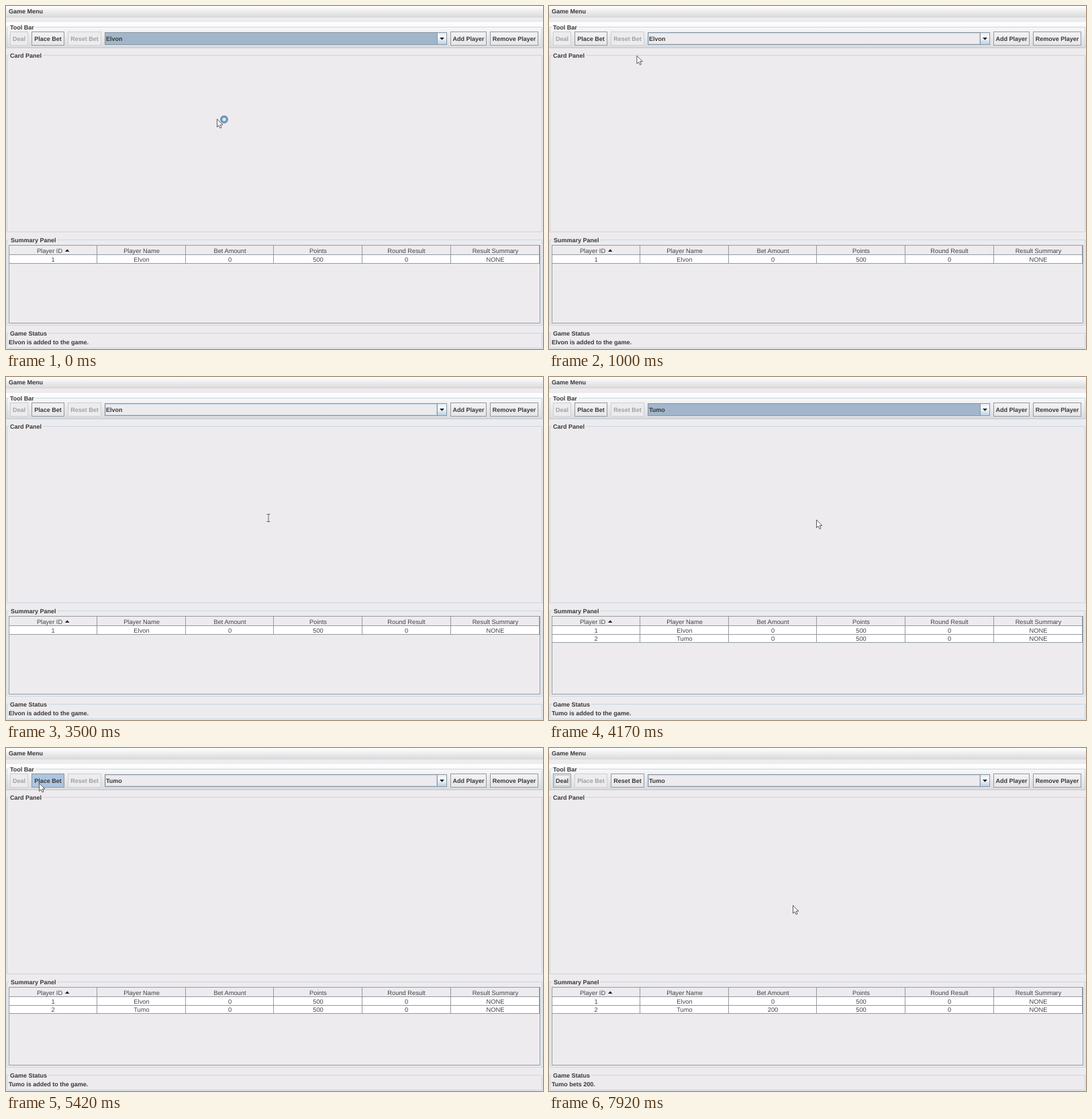
Animation, 800 px wide and 511 px high, one loop 8000 ms. Source, as an HTML page:

```html
<!DOCTYPE html>
<html lang="en">
<head>
<meta charset="utf-8">
<title>Card game window</title>
<style>
html, body { margin: 0; width: 100%; height: 100%; overflow: hidden; background: #edebee; }
svg { display: block; width: 100%; height: 100%; }
text { font: 9.3px "Liberation Sans", Arial, sans-serif; fill: #444; white-space: pre; text-rendering: geometricPrecision; }
.b { font-size: 9px; font-weight: bold; fill: #383838; }
.key { font-size: 7.9px; fill: #6382bf; }
</style>
</head>
<body>
<svg id="stage" viewBox="0 0 800 511" preserveAspectRatio="none">
  <defs>
    <linearGradient id="bar" x2="0" y2="1">
      <stop offset="0" stop-color="#fff"/><stop offset="1" stop-color="#dcdbdd"/>
    </linearGradient>
    <linearGradient id="btn" x2="0" y2="1">
      <stop offset="0" stop-color="#f3f2f4"/><stop offset="1" stop-color="#e6e5e7"/>
    </linearGradient>
    <linearGradient id="drop" x2="0" y2="1">
      <stop offset="0" stop-color="#dde8f3"/><stop offset=".35" stop-color="#fff"/><stop offset="1" stop-color="#b8cfe5"/>
    </linearGradient>
  </defs>
</svg>
<script>
const NS = "http://www.w3.org/2000/svg";
const stage = document.getElementById("stage");
const FIRST = "Elvon", SECOND = "Tumo";
const EDGE = "#8795a3", GRID = "#959aa0", PALE = "#c6d6e4", PICK = "#a1b6ca", DOWN = "#adc5df", BASE = "#edebee";

function add(parent, tag, attrs) {
  const el = document.createElementNS(NS, tag);
  for (const k in attrs) el.setAttribute(k, attrs[k]);
  parent.appendChild(el);
  return el;
}
const group = (parent = stage) => add(parent, "g", {});
const rect = (parent, x, y, width, height, fill, stroke = "none") =>
  add(parent, "rect", { x, y, width, height, fill, stroke });
const path = (parent, d, fill, stroke = "none", width = 1) =>
  add(parent, "path", { d, fill, stroke, "stroke-width": width });
// y is the middle of the line of text
function label(parent, str, x, y, cls = "b", anchor = "start") {
  const el = add(parent, "text", { x, y: y + 3.2, class: cls, "text-anchor": anchor });
  el.textContent = str;
  return el;
}
const show = (el, on) => el.setAttribute("display", on ? "inline" : "none");

function titled(str, y, bottom, x, gapEnd) {
  path(stage, `M${x - 2} ${y}H1.5V${bottom}H798.5V${y}H${gapEnd}`, "none", PALE);
  label(stage, str, x, y);
}

function button(str, x, right) {
  const box = rect(stage, x + .5, 38.5, right - x - 1, 20, "url(#btn)", GRID);
  const ring = rect(stage, x + 2.5, 40.5, right - x - 5, 16, "none", "#b3c4d6");
  const txt = label(stage, str, (x + right) / 2, 49, "b", "middle");
  return (state) => {
    const off = state === "off", down = state === "down";
    box.setAttribute("fill", down ? DOWN : off ? "#ecebed" : "url(#btn)");
    box.setAttribute("stroke", off ? "#cfd0d3" : down ? EDGE : GRID);
    txt.style.fill = off ? "#a0a0a2" : "#383838";
    show(ring, state === "focus");
  };
}

// window
rect(stage, 0, 0, 800, 511, BASE);
rect(stage, 0, 0, 800, 16, "url(#bar)");
rect(stage, 0, 16, 800, 1, "#d6d5d7");
rect(stage, 0, 24, 800, 38, "url(#bar)");
rect(stage, 0, 62, 800, 1, "#d0cfd1");
titled("Tool Bar", 31.5, 61.5, 6, 44);
titled("Card Panel", 73.5, 336.5, 6, 55);
titled("Summary Panel", 348.5, 475.5, 7, 76);
titled("Game Status", 487.5, 509.5, 6, 63);

const deal = button("Deal", 6, 33);
const bet = button("Place Bet", 38, 87);
const reset = button("Reset Bet", 92, 142);
button("Add Player", 662, 716)("on");
button("Remove Player", 721, 793)("on");

// player chooser
const combo = rect(stage, 147.5, 39.5, 509, 18, BASE, EDGE);
const comboInner = rect(stage, 148.5, 40.5, 493, 16, "none", "#c4d5e6");
rect(stage, 642.5, 39.5, 14, 18, "url(#drop)", EDGE);
path(stage, "M646 47H653L649.5 50.8Z", "#222");
const comboText = label(stage, "", 149, 48.5);

// table
const centers = [70, 202, 333.5, 465, 596.5, 729];
const columns = [135.5, 267.5, 398.5, 530.5, 662.5, 794.5];
rect(stage, 4.5, 356.5, 791, 116, "none", GRID);
["Player ID", "Player Name", "Bet Amount", "Points", "Round Result", "Result Summary"]
  .forEach((s, i) => label(stage, s, i ? centers[i] : 65, 364.5, "", "middle"));
path(stage, "M88 366H94.5L91.2 362.3Z", "#222");
path(stage, "M5 370.5H795" + columns.map(x => `M${x} 357V371`).join(""), "none", GRID);

function row(y, values) {
  const g = group();
  rect(g, 5, y, 789, 12, "#fff");
  path(g, `M5 ${y + 12.5}H795` + columns.map(x => `M${x} ${y}V${y + 12.5}`).join(""), "none", GRID);
  return { g, cells: values.map((v, i) => label(g, v, centers[i], y + 6.4, "", "middle")) };
}
// the lower row goes in first so that the line between the rows stays on top
const second = row(383, ["2", SECOND, "0", "500", "0", "NONE"]);
row(371, ["1", FIRST, "0", "500", "0", "NONE"]);
const status = label(stage, "", 4, 501);

// menu
const menu = group();
rect(menu, 0, 0, 58.5, 16.5, PICK, "#7f9bb8");
rect(menu, .5, 17.5, 139.5, 96, BASE, "#6f8fb5");
const items = [["New Game", "Ctrl-N"], ["Add Player", "Shift-Plus"], ["Remove Player", "Shift-Minus"],
  ["Check For Updates", ""], ["About", ""], ["Exit", "Ctrl-X"]].map(([name, key], i) => {
  const y = 26 + i * 15.75;
  const back = rect(menu, 1, y - 7.8, 138.5, 15.6, PICK);
  label(menu, name, 5, y);
  return { back, key: label(menu, key, 90, y, "key") };
});
label(stage, "Game Menu", 4, 8);

// pointers
const pointer = group();
const arrow = path(pointer, "M.5 .5V12.3L3.2 9.8L5.1 14L7 13.1L5.2 9H8.9Z", "#fff", "#333", .8);
const beam = path(pointer, "M-2.5 -5.5H2.5M0 -5.5V5.5M-2.5 5.5H2.5", "none", "#555", .9);
const busy = group(pointer);
add(busy, "circle", { cx: 11, cy: 1, r: 4.5, fill: "#b9d4e6", stroke: "#6d93b5", "stroke-width": 3 });
add(busy, "circle", { cx: 11, cy: 1, r: 1.8, fill: "#e4f1f8" });

// time, x, y
const track = [
  [0, 314, 168], [420, 40, 9], [500, 41, 12], [580, 41, 20], [750, 45, 39], [920, 46, 41],
  [1250, 617, 262], [1500, 401, 214], [1670, 391, 211], [2250, 391, 210], [3920, 391, 210],
  [4500, 409, 216], [4750, 409, 216], [5330, 49, 52], [5500, 49, 52], [6080, 357, 224],
  [6330, 357, 224], [6500, 362, 241], [6670, 362, 241], [6750, 362, 234], [7750, 362, 234],
  [7920, 363, 234], [8000, 363, 234]
];

function spot(t) {
  const i = Math.max(1, track.findIndex(p => p[0] >= t));
  const [t0, x0, y0] = track[i - 1], [t1, x1, y1] = track[i];
  const u = (t - t0) / (t1 - t0), e = u * u * (3 - 2 * u);
  return [x0 + (x1 - x0) * e, y0 + (y1 - y0) * e];
}

function draw(time) {
  const t = Math.floor((time + 4) * .012) / .012 + .01;
  const [x, y] = spot(Math.min(t, 7999));
  const joined = t >= 3916, placed = t >= 7750;
  const focused = t < 500 || (joined && t < 5330);

  pointer.setAttribute("transform", `translate(${x.toFixed(2)} ${y.toFixed(2)})`);
  const text = t >= 1410 && !joined;
  show(beam, text);
  show(arrow, !text);
  show(busy, t < 170);

  show(menu, t >= 490 && t < 916);
  items.forEach((item, i) => {
    const on = y > 17 && Math.floor((y - 18) / 15.75) === i;
    show(item.back, on);
    item.key.style.fill = on ? "#333" : "#6382bf";
  });

  deal(placed ? "focus" : "off");
  bet(placed ? "off" : t >= 5330 && t < 5495 ? "down" : "on");
  reset(placed ? "on" : "off");
  combo.setAttribute("fill", focused ? PICK : BASE);
  show(comboInner, !focused);
  comboText.textContent = joined ? SECOND : FIRST;

  show(second.g, joined);
  second.cells[2].textContent = placed ? "200" : "0";
  status.textContent = placed ? `${SECOND} bets 200.` : `${joined ? SECOND : FIRST} is added to the game.`;
}

const start = performance.now();
function tick() {
  draw((performance.now() - start) % 8000);
  requestAnimationFrame(tick);
}
tick();
</script>
</body>
</html>
```
